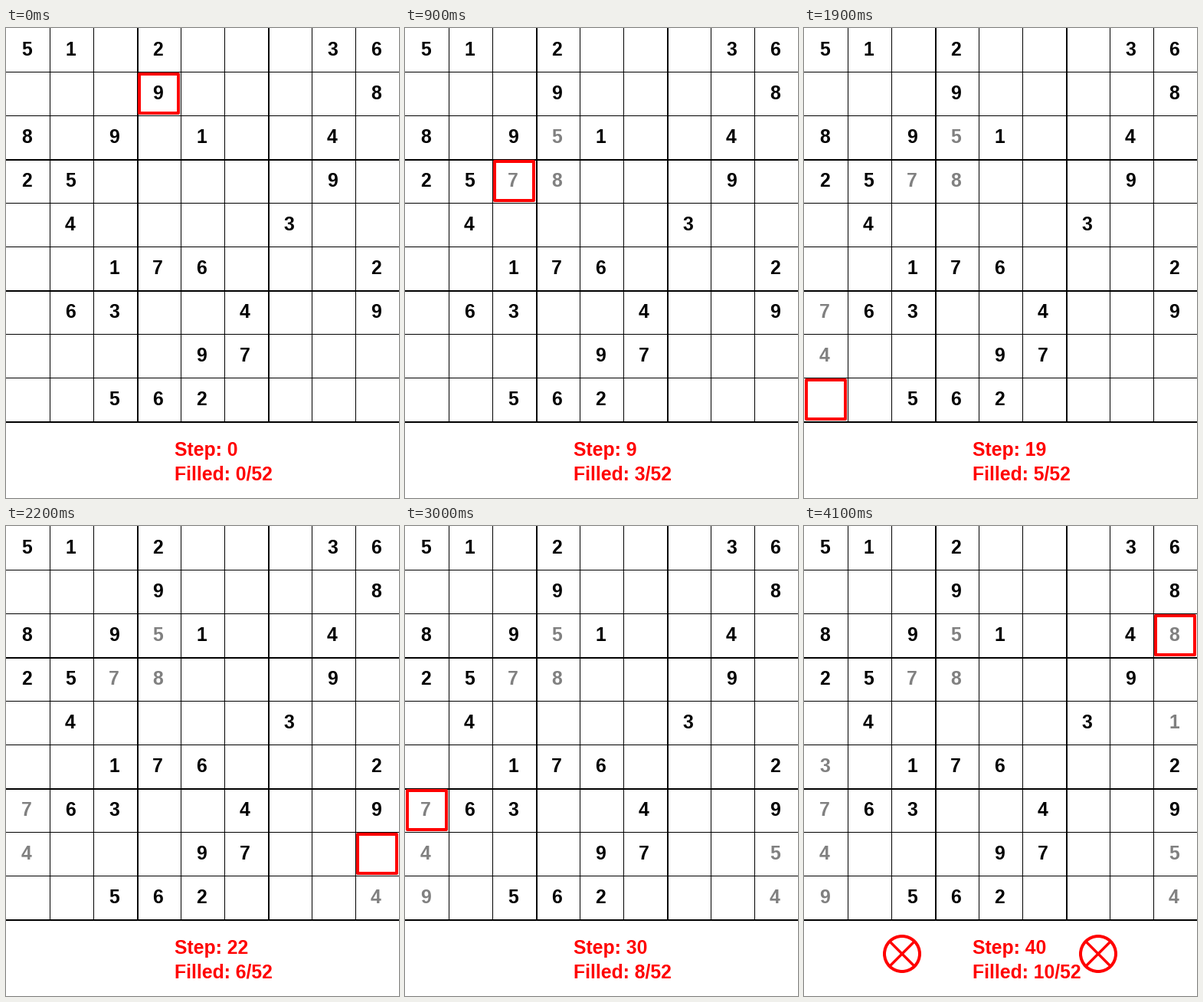
A matplotlib script that plays this animation: 513 by 613 pixels, repeating every 4.2 s.

```python
import matplotlib.pyplot as plt
from matplotlib.animation import FuncAnimation
from matplotlib.patches import Circle, Rectangle

W, H, CELL = 513, 613, 57
RED, GRAY = "#ff0000", "#808080"
CLUES = [
    "51.2...36",
    "...9....8",
    "8.9.1..4.",
    "25.....9.",
    ".4....3..",
    "..176...2",
    ".63..4..9",
    "....97...",
    "..562....",
]
# Letters move the cursor (wrapping), digits write, a dot waits.
# The last entry breaks the rules and ends the game.
PLAY = "D5.D8.L7." ".LDDD" "L7D4D" "L4U5.DR" "9.UUU3.UL" "1.UU." "8"
MOVES = {"U": (-1, 0), "D": (1, 0), "L": (0, -1), "R": (0, 1)}
FRAMES = len(PLAY) + 1
EMPTY = sum(row.count(".") for row in CLUES)

# At 72 dpi one point is one pixel; the sliver guards against truncation.
fig = plt.figure(figsize=((W + 0.01) / 72, (H + 0.01) / 72), dpi=72, facecolor="white")
ax = fig.add_axes([0, 0, 1, 1])
ax.set_xlim(0, W)
ax.set_ylim(H, 0)
ax.axis("off")


def bar(x, y, w, h):
    ax.add_patch(Rectangle((x, y), w, h, fc="black", lw=0, antialiased=False, zorder=1))


def label(x, y, text="", color="black"):
    return ax.text(x, y, text, color=color, family="Liberation Sans",
                   weight="bold", size=24.7, va="baseline", zorder=3)


def fail_mark(x, y):
    ring = Circle((x, y), 23, fill=False, ec=RED, lw=4, zorder=4)
    ax.add_patch(ring)
    d = 16
    strokes = [ax.plot([x - d, x + d], [y - s * d, y + s * d], color=RED, lw=3.4,
                       solid_capstyle="butt", zorder=4)[0] for s in (1, -1)]
    return [ring, *strokes]


for i in range(1, 10):
    width = 2 if i % 3 == 0 else 1
    bar(i * CELL, 0, width, W + 1)
    bar(0, i * CELL, W, width)

digits = {}
for r, row in enumerate(CLUES):
    for c, ch in enumerate(row):
        x, y = c * CELL + 20, r * CELL + 36
        if ch == ".":
            digits[r, c] = label(x, y, "", GRAY)
        else:
            label(x, y, ch)

cursor = Rectangle((0, 0), 51, 51, fill=False, ec=RED, lw=4, joinstyle="round", zorder=5)
ax.add_patch(cursor)
step_text = label(220, 558, color=RED)
filled_text = label(220, 589, color=RED)
marks = fail_mark(128, 558) + fail_mark(384, 558)


def replay(n):
    """Cursor cell and written digits after n entries of PLAY."""
    r, c = 1, 3
    written = {}
    for key in PLAY[:n]:
        if key in MOVES:
            dr, dc = MOVES[key]
            r, c = (r + dr) % 9, (c + dc) % 9
        elif key.isdigit():
            written[r, c] = key
    return (r, c), written


def draw(n):
    (r, c), written = replay(n)
    failed = n == len(PLAY)
    for cell, text in digits.items():
        text.set_text(written.get(cell, ""))
    cursor.set_xy((c * CELL + 3, r * CELL + 3))
    step_text.set_text(f"Step: {n - failed}")
    filled_text.set_text(f"Filled: {len(written) - failed}/{EMPTY}")
    for m in marks:
        m.set_visible(failed)
    return [cursor, step_text, filled_text, *marks, *digits.values()]


anim = FuncAnimation(fig, draw, frames=FRAMES, interval=100, repeat=True,
                     repeat_delay=0, blit=False)
plt.show()
```
